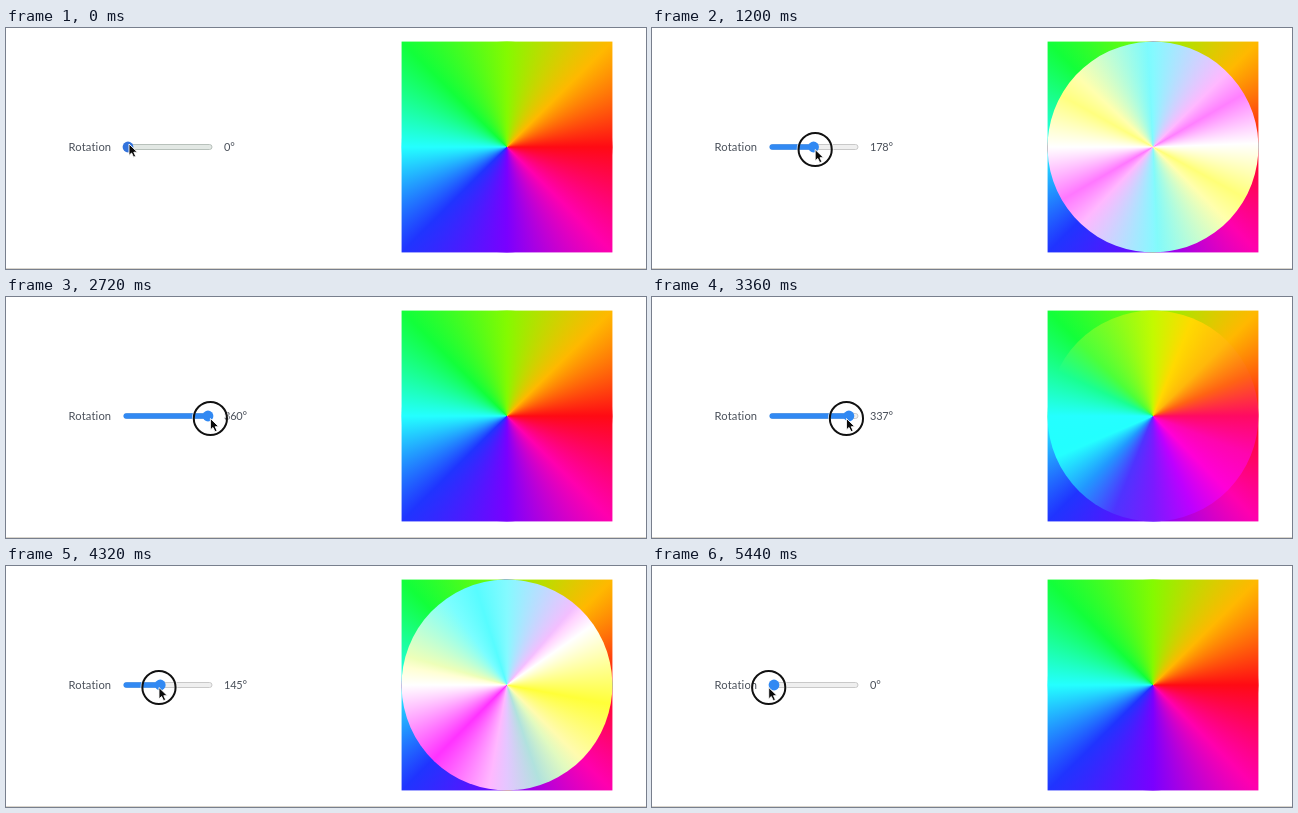
Recreate the animation shown at these times as an HTML page. Size 640 px wide and 241 px high, loop 5.52 s.

```html
<!DOCTYPE html>
<html lang="en">
<head>
<meta charset="utf-8">
<title>Rotation</title>
<style>
html, body { margin: 0; width: 100%; height: 100%; overflow: hidden; background: #fff; }
#stage { position: relative; width: 640px; height: 241px; overflow: hidden; background: #fff; }
/* the slight scale gives the square its soft edge */
#wheel { position: absolute; left: 396px; top: 14px; width: 210px; height: 210px; isolation: isolate; transform: scale(1.004); }
#wheel, #disc {
  background: conic-gradient(from 90deg,
    #ff0a14, #ff00ae, #7a00ff, #2034ff, #24ffff, #12ff3a, #84fa00, #ffb800, #ff0a14);
}
#disc { width: 100%; height: 100%; border-radius: 50%; mix-blend-mode: lighten; }
svg { position: absolute; left: 0; top: 0; }
text { font: 11.2px Lato, "Open Sans", sans-serif; letter-spacing: 0.12px; fill: #4a505a; }
#value { font-size: 11px; letter-spacing: -0.2px; }
</style>
</head>
<body>
<div id="stage">
  <div id="wheel"><div id="disc"></div></div>
  <svg width="640" height="241" viewBox="0 0 640 241">
    <rect y="240" width="640" height="1" fill="#d9d5cd"/>
    <text x="62.6" y="122.6">Rotation</text>
    <text id="value" x="218" y="122.6">0°</text>
    <rect id="track" x="118" y="116.5" width="88" height="5" rx="2.5" fill="#efefef" stroke="#c4c4c4" stroke-width="0.9"/>
    <rect id="fill" x="117.5" y="116.2" height="5.5" rx="2.7" fill="#3189f3"/>
    <circle id="knob" cy="119" r="5.4" fill="#3189f3"/>
    <g id="pointer">
      <g id="ring">
        <circle r="17.8" fill="none" stroke="#fff" stroke-opacity="0.7" stroke-width="1.4"/>
        <circle r="16.6" fill="none" stroke="#111" stroke-width="2"/>
      </g>
      <path d="M0 0V11.4L2.6 9L4.6 13.2L6.7 12.2L4.8 8.2H8.4Z" fill="#0a0a0a" stroke="#fff" stroke-width="0.9"/>
    </g>
  </svg>
</div>
<script>
const LOOP = 5520, STEP = 80, TURN = 2734;

const $ = id => document.getElementById(id);
const disc = $('disc'), value = $('value'), track = $('track'), fill = $('fill');
const knob = $('knob'), pointer = $('pointer'), ring = $('ring');

const progress = (t, from, to) => Math.max(0, Math.min(1, (t - from) / (to - from)));
const easeOut = u => 1 - (1 - u) ** 1.168;
const easeInOut = u => (1 - Math.cos(Math.PI * u)) / 2;

const turnAt = t => easeOut(progress(t, STEP, 2610)) - easeInOut(progress(t, 2967, 5377));

// leads the knob on the way out, follows its own sweep on the way back
function pointerX(t, knobX) {
  if (t < TURN) return knobX + 1 + 1.4 * progress(t, 0, TURN);
  return 204.4 - 88.4 * easeInOut(progress(t, TURN, 5606));
}

function draw(t) {
  const angle = Math.round(turnAt(t) * 360);
  const x = 122 + angle / 360 * 80;
  const y = 116 + 5.5 * progress(t, 0, 400);
  const idle = t < STEP;
  disc.style.transform = `rotate(${angle}deg)`;
  value.textContent = angle + '°';
  fill.setAttribute('width', x - 117.5);
  fill.setAttribute('visibility', angle ? 'visible' : 'hidden');
  knob.setAttribute('cx', x);
  knob.setAttribute('fill', idle ? '#3373dc' : '#3189f3');
  track.setAttribute('fill', idle ? '#e2e8e4' : '#efefef');
  track.setAttribute('stroke', idle ? '#b3bbb6' : '#c4c4c4');
  ring.setAttribute('visibility', idle ? 'hidden' : 'visible');
  pointer.setAttribute('transform', `translate(${pointerX(t, x)} ${y})`);
}

const start = performance.now();
function tick() {
  const t = (performance.now() - start) % LOOP;
  draw(Math.floor(t / STEP) * STEP);
  requestAnimationFrame(tick);
}
draw(0);
requestAnimationFrame(tick);
</script>
</body>
</html>
```
